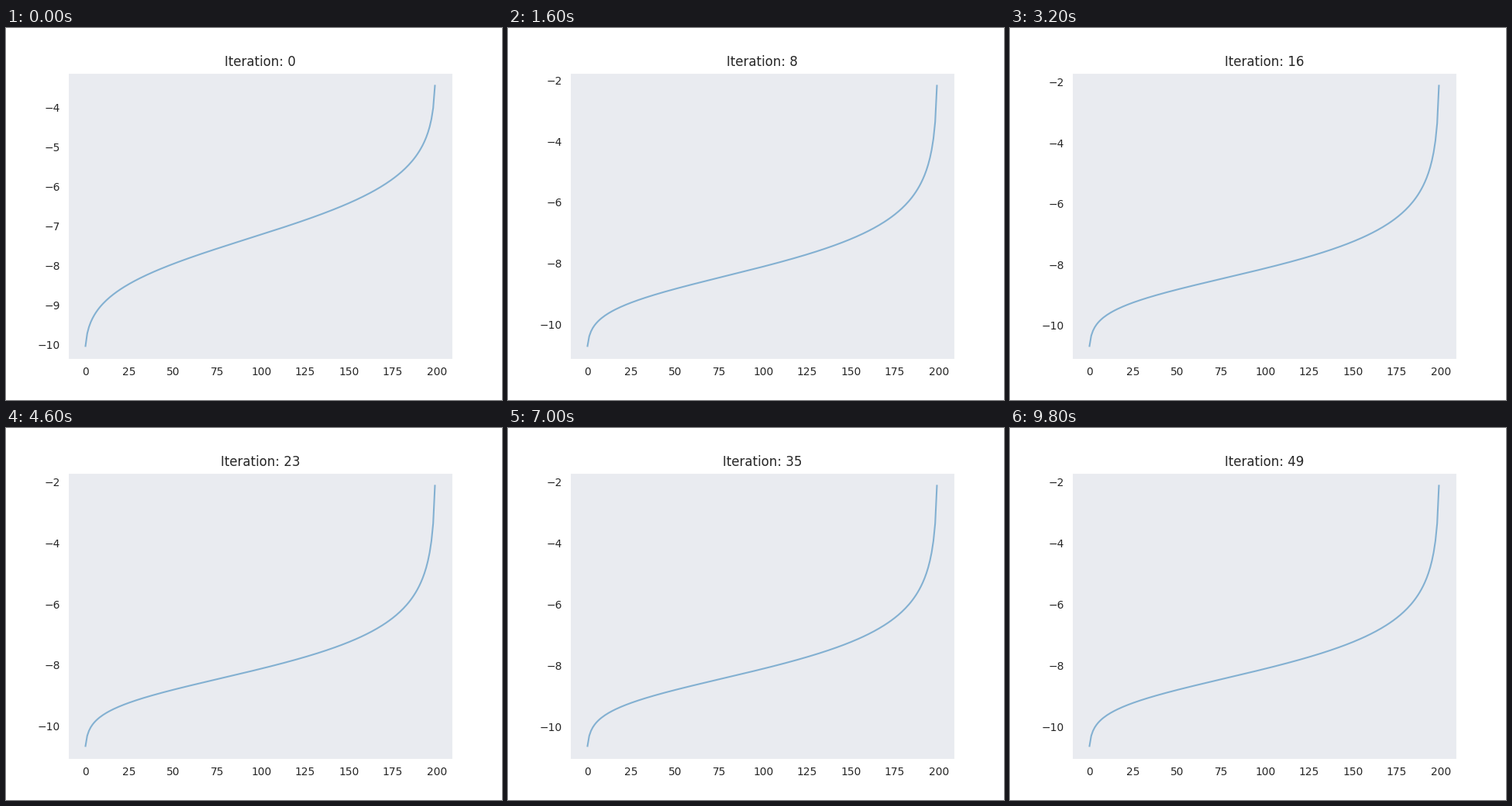
Write a matplotlib script that moves like this. It is 640 px wide and 480 px high and loops after 10000 ms.

```python
import matplotlib.pyplot as plt
import numpy as np
from matplotlib.animation import FuncAnimation
from matplotlib.transforms import ScaledTranslation

STEPS, COUNT = 50, 200
INK = "0.15"
BEND = 1.4  # width of the change from the left slope to the right one

# iteration: lowest, middle and highest value, extra swell of the curve
KEYS = {
    0: (-10.03, -7.215, -3.44, 0.30),
    4: (-10.507, -7.79, -2.58, 0.24),
    5: (-10.60, -7.89, -2.44, 0.20),
    8: (-10.704, -8.105, -2.16, 0.06),
    16: (-10.668, -8.12, -2.105, 0.0),
    35: (-10.618, -8.10, -2.112, 0.0),
}

# Ranks on a logit scale, where the sorted values form a smooth bend.
rank = np.arange(COUNT)
z = np.log((rank + 0.5) / (COUNT - 0.5 - rank))


def settle(t):
    """Time scale on which the values converge."""
    return 1 - np.exp(-np.minimum(t, max(KEYS)) / 12)


key_s = settle(np.array(list(KEYS)))
key_v = np.array(list(KEYS.values()))
key_d = np.gradient(key_v, key_s, axis=0, edge_order=2)


def state(n):
    """Smooth cubic interpolation between the key iterations."""
    s = settle(n)
    i = min(np.searchsorted(key_s, s, side="right"), len(key_s) - 1) - 1
    h = key_s[i + 1] - key_s[i]
    u = (s - key_s[i]) / h
    return (key_v[i] * (1 + 2 * u) * (1 - u) ** 2 + key_v[i + 1] * u * u * (3 - 2 * u)
            + h * u * (1 - u) * (key_d[i] * (1 - u) - key_d[i + 1] * u))


def ramp(x):
    return BEND * np.log((1 + np.exp(x / BEND)) / 2)


def curve(n):
    low, mid, high, swell = state(n)
    p, q = ramp(z[-1]), ramp(z[0])
    right, left = np.linalg.solve([[p, -q], [q, -p]], [high - mid, low - mid])
    return (mid + right * ramp(z) - left * ramp(-z)
            + swell * np.sin(np.pi * z / z[-1]))


fig, ax = plt.subplots(figsize=(6.4, 4.8), dpi=100, facecolor="white")
half_pixel_up = ScaledTranslation(0, 0.5 / 100, fig.dpi_scale_trans)


def draw(n):
    ax.clear()
    ax.set_facecolor("#E9EBF0")
    for spine in ax.spines.values():
        spine.set_color("white")
    ax.tick_params(length=0, pad=7, labelsize=10, labelcolor=INK)
    ax.plot(rank, curve(n), color="#1f77b4", alpha=0.5, lw=1.5)
    ax.set_title(f"Iteration: {n}", fontsize=12, color=INK)
    for label in ax.get_yticklabels():
        label.set_transform(label.get_transform() + half_pixel_up)


anim = FuncAnimation(fig, draw, frames=STEPS, interval=200, repeat=True,
                     repeat_delay=0, blit=False)
plt.show()
```
